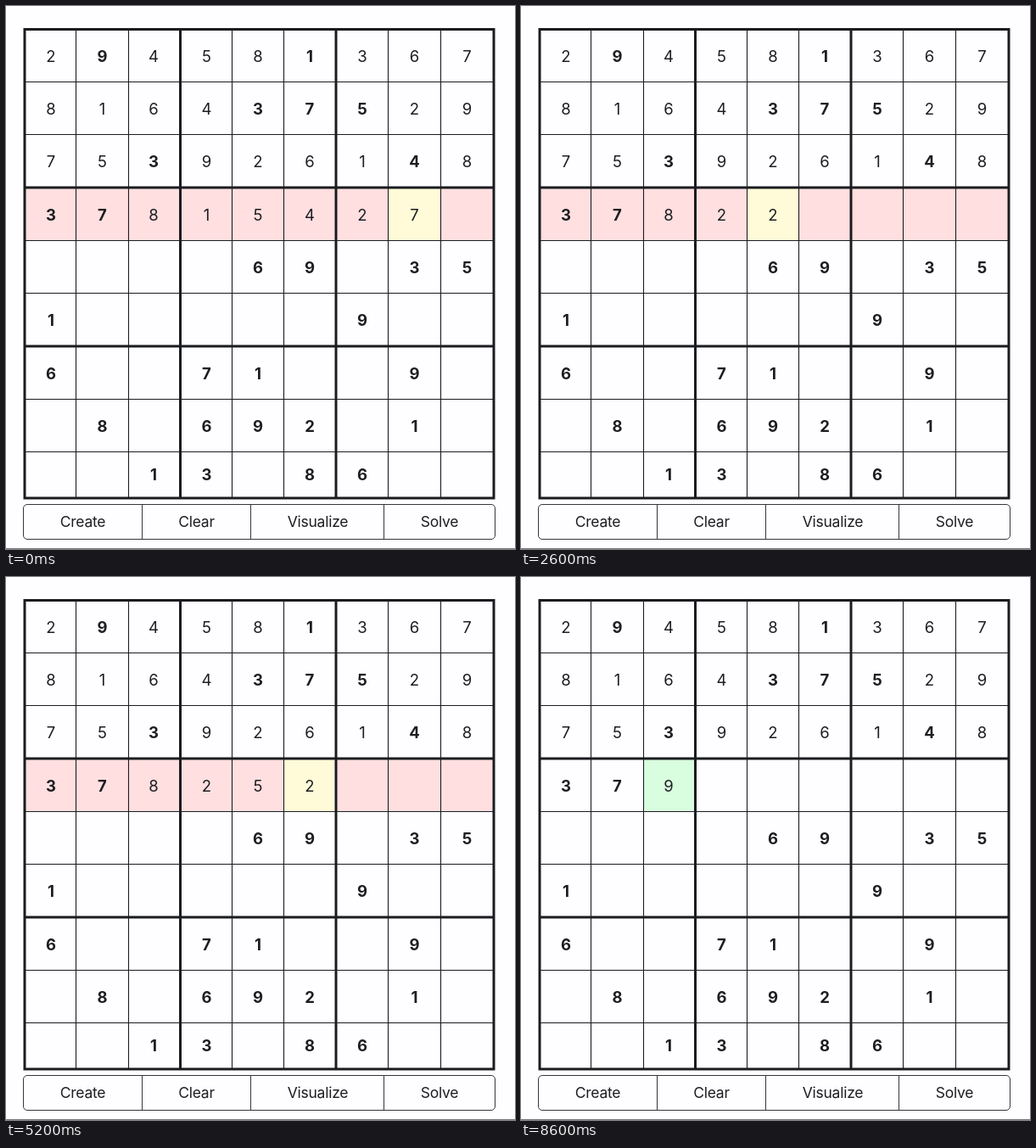
An HTML page that plays this animation: 600x640 px, repeating every 8700 ms.

```html
<!DOCTYPE html>
<html lang="en">
<head>
<meta charset="utf-8">
<title>Sudoku solver</title>
<style>
  html, body { margin: 0; width: 100%; height: 100%; overflow: hidden; background: #fefdff; }
  svg { display: block; width: 600px; height: 640px; }
  text { font-family: Inter, "Liberation Sans", sans-serif; fill: #1d1e22; text-anchor: middle; }
  .digit { font-size: 18.5px; }
  .given { font-weight: 700; }
  .label { font-size: 17.5px; letter-spacing: -0.25px; }
  .grid { stroke: #1b1c20; fill: none; }
  .frame { stroke: #34373c; fill: none; }
</style>
</head>
<body>
<svg id="stage" viewBox="0 0 600 640"></svg>
<script>
const LOOP = 8700, TICK = 100;
const COLORS = { none: 'none', clash: '#ffdfe0', trial: '#fffbd8', ok: '#d9fddf' };
const xs = [22, 82.5, 144.5, 205.5, 266.5, 327.5, 389, 450.5, 512.5, 575];
const ys = [27.5, 89.5, 151.5, 214, 276.5, 338.5, 401, 463.5, 525.5, 580];
const cx = [53, 113.5, 174, 236.5, 297, 358, 420, 481.5, 543.5];
const cy = [59.5, 121, 183.5, 246, 308, 370, 433.5, 495, 552.5];

const givens = [
  '.9...1...', '....375..', '..3....4.',
  '37.......', '....69.35', '1.....9..',
  '6..71..9.', '.8.692.1.', '..13.86..'
].join('');
const start = ['294581367', '816437529', '753926148', '37815427.'].join('') + givens.slice(36);

const svg = document.getElementById('stage');
function add(tag, attrs, text) {
  const el = document.createElementNS('http://www.w3.org/2000/svg', tag);
  for (const k in attrs) el.setAttribute(k, attrs[k]);
  if (text) el.textContent = text;
  return svg.appendChild(el);
}

// Groups that share a cell with index i, in checking order.
function groupsOf(i) {
  const r = Math.floor(i / 9), c = i % 9;
  const all = [...Array(81).keys()];
  const box = k => Math.floor(k / 27) * 3 + Math.floor(k % 9 / 3);
  return [
    all.filter(k => Math.floor(k / 9) === r),
    all.filter(k => k % 9 === c),
    all.filter(k => box(k) === box(i))
  ];
}

// Backtracking search, one recorded step per trial or retreat.
function solve(count) {
  const board = [...start], steps = [];
  let pos = 34, value = 7;
  const record = marks => steps.push({ board: board.slice(), marks });
  while (steps.length < count) {
    if (value > 9) {
      board[pos] = '.';
      record({});
      do pos--; while (givens[pos] !== '.');
      value = +board[pos] + 1;
      continue;
    }
    board[pos] = String(value);
    const clash = groupsOf(pos).find(g => g.some(k => k !== pos && board[k] === board[pos]));
    const marks = {};
    if (clash) clash.forEach(k => marks[k] = 'clash');
    marks[pos] = clash ? 'trial' : 'ok';
    record(marks);
    if (clash) value++;
    else {
      do pos++; while (givens[pos] !== '.');
      value = 1;
    }
  }
  return steps;
}

const fills = [], digits = [];
for (let i = 0; i < 81; i++) {
  const r = Math.floor(i / 9), c = i % 9;
  fills.push(add('rect', {
    x: xs[c], y: ys[r], width: xs[c + 1] - xs[c], height: ys[r + 1] - ys[r], fill: 'none'
  }));
}
for (let i = 0; i < 81; i++) {
  digits.push(add('text', {
    class: givens[i] === '.' ? 'digit' : 'digit given',
    x: cx[i % 9], y: cy[Math.floor(i / 9)] + 6.7
  }));
}

for (const thick of [false, true]) {
  for (let i = 1; i < 9; i++) {
    if ((i % 3 === 0) !== thick) continue;
    const width = thick ? 3 : 1.1;
    add('path', { class: 'grid', 'stroke-width': width, d: `M${xs[i]} 27V580M22 ${ys[i]}H575` });
  }
}
add('rect', { class: 'grid', 'stroke-width': 3, x: 22, y: 27.5, width: 553, height: 552.5 });

add('rect', { class: 'frame', x: 20.5, y: 587.5, width: 556, height: 41, rx: 4.5 });
for (const x of [161, 289, 446]) add('path', { class: 'frame', d: `M${x - 0.5} 587.5V628.5` });
[['Create', 90.5], ['Clear', 224.5], ['Visualize', 367.5], ['Solve', 511]]
  .forEach(([name, x]) => add('text', { class: 'label', x, y: 614.3 }, name));
add('rect', { x: 0, y: 639, width: 600, height: 1, fill: '#77777a' });

const steps = solve(83);
let shown = -1;
function draw(time) {
  const tick = Math.floor((time % LOOP) / TICK);
  // The solver runs slightly slower than the tick: one is held in every 27.
  const index = tick - Math.floor((tick + 25) / 27);
  if (index === shown) return;
  shown = index;
  const { board, marks } = steps[index];
  for (let i = 0; i < 81; i++) {
    fills[i].setAttribute('fill', COLORS[marks[i] || 'none']);
    digits[i].textContent = board[i] === '.' ? '' : board[i];
  }
}

const begin = performance.now();
function loop() {
  draw(performance.now() - begin);
  requestAnimationFrame(loop);
}
loop();
</script>
</body>
</html>
```
